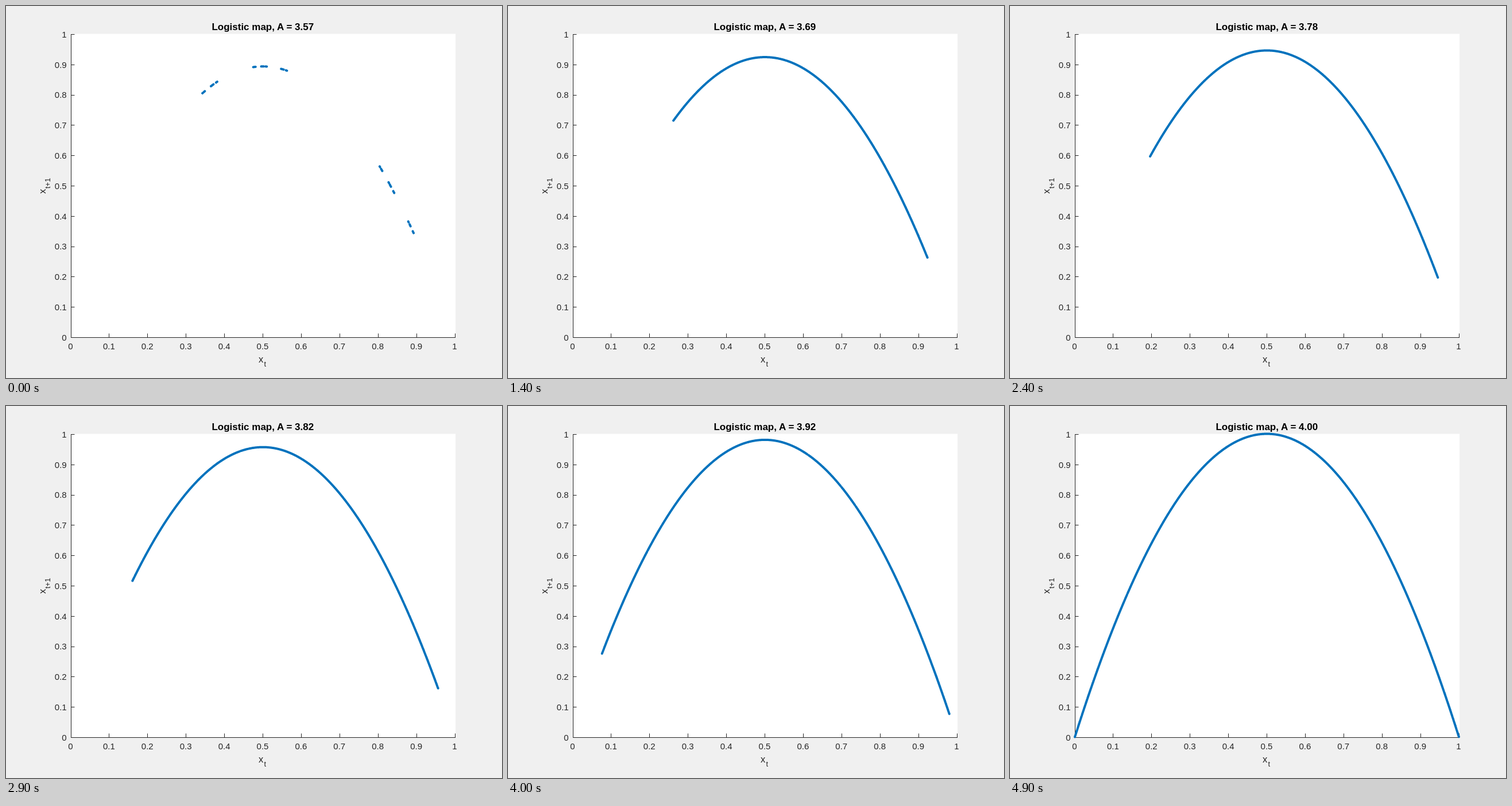
Animation, 864 px wide and 648 px high, one loop 5000 ms. Source, as an HTML page:

```html
<!DOCTYPE html>
<html lang="en">
<head>
<meta charset="utf-8">
<title>Logistic map</title>
<style>
  html, body { margin: 0; width: 100%; height: 100%; overflow: hidden; background: #f0f0f0; }
  svg { display: block; width: 864px; height: 648px; }
  text { font-family: "Liberation Sans", Arial, sans-serif; font-size: 15px; fill: #262626; }
  #title { font-size: 17px; font-weight: bold; fill: #000; text-anchor: middle; }
  .label { font-size: 16.5px; }
  .sub { font-size: 13px; }
  #axes { fill: none; stroke: #262626; stroke-width: 1; }
  #dots { fill: none; stroke: #0072bd; stroke-width: 4; stroke-linecap: round; stroke-linejoin: round; }
</style>
</head>
<body>
<svg viewBox="0 0 864 648">
  <rect width="864" height="648" fill="#f0f0f0"/>
  <rect x="113" y="48.5" width="670" height="529.5" fill="#fff"/>
  <path id="axes"/>
  <g id="ticks"></g>
  <text class="label" x="440" y="621">x</text>
  <text class="sub" x="449.5" y="628">t</text>
  <g transform="translate(69 327) rotate(-90)">
    <text class="label">x</text>
    <text class="sub" x="9" y="8">t+1</text>
  </g>
  <text id="title" x="447.3" y="42"></text>
  <path id="dots"/>
</svg>
<script>
const STEPS = 50, STEP_MS = 100;
const A_MIN = 3.57, A_MAX = 4;
const SKIP = 1000, COUNT = 6000;
const JOIN = 2, MERGE = 0.15; // px

const $ = id => document.getElementById(id);
const px = x => 113 + 669 * x;
const py = y => 576.5 - 528 * y;

function addTick(x, y, value, anchor) {
  const t = document.createElementNS("http://www.w3.org/2000/svg", "text");
  t.setAttribute("x", x);
  t.setAttribute("y", y);
  t.setAttribute("text-anchor", anchor);
  t.textContent = value;
  $("ticks").append(t);
}

function drawAxes() {
  let d = "M113.5 49V577.5H783";
  for (let i = 0; i <= 10; i++) {
    const v = i / 10;
    const x = Math.floor(px(v)) + 0.5, y = Math.floor(py(v)) + 1.5;
    d += `M${x} 577.5v-7M113.5 ${y}h6`;
    addTick(px(v) - 0.5, 598, v, "middle");
    addTick(105.7, py(v) + 6.2, v, "end");
  }
  $("axes").setAttribute("d", d);
}

// Settled orbit of x -> A x (1 - x), sorted by x.
function orbit(a) {
  const xs = [];
  let x = 0.2;
  for (let i = 0; i < SKIP + COUNT; i++) {
    if (i >= SKIP) xs.push(x);
    x = a * x * (1 - x);
  }
  return xs.sort((p, q) => p - q);
}

// Touching dots become one stroke, lone dots stay round caps.
function orbitPath(a) {
  let d = "", lastX = -99, lastY = -99;
  for (const v of orbit(a)) {
    const x = px(v), y = py(a * v * (1 - v));
    const gap = Math.hypot(x - lastX, y - lastY);
    if (gap < MERGE) continue;
    const at = x.toFixed(2) + " " + y.toFixed(2);
    d += gap < JOIN ? "L" + at : "M" + at + "h0";
    lastX = x;
    lastY = y;
  }
  return d;
}

let shown = -1;
function show(step) {
  if (step === shown) return;
  shown = step;
  const a = Math.min(A_MAX, A_MIN + (A_MAX - A_MIN) * step / (STEPS - 1));
  $("title").textContent = "Logistic map, A = " + a.toFixed(2);
  $("dots").setAttribute("d", orbitPath(a));
}

let start;
function tick(now) {
  start ??= now;
  show(Math.floor(Math.max(0, now - start) / STEP_MS) % STEPS);
  requestAnimationFrame(tick);
}

drawAxes();
show(0);
requestAnimationFrame(tick);
</script>
</body>
</html>
```
